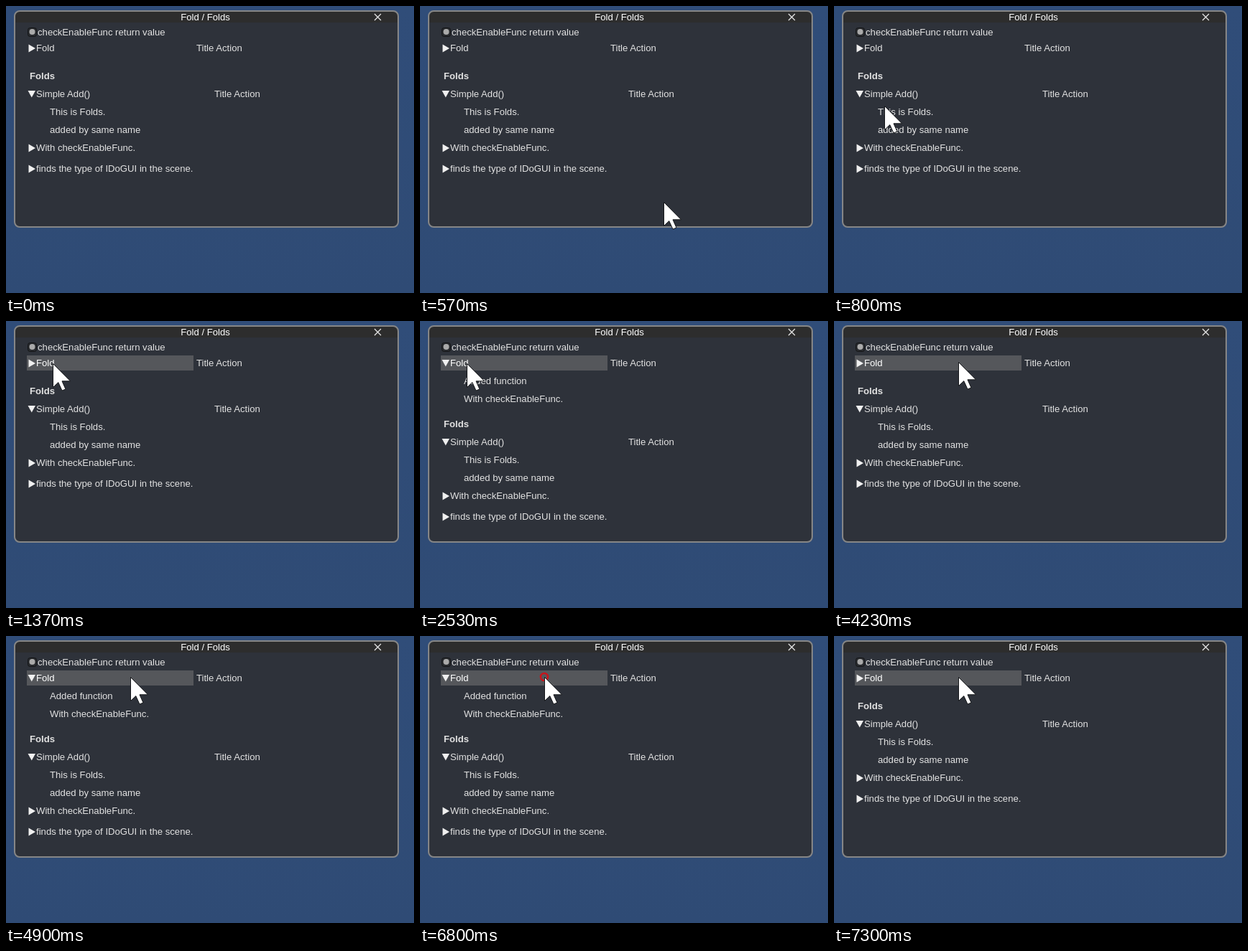
Recreate the animation shown at these times as an HTML page. Size 568x400 px, loop 7.76 s.

```html
<!DOCTYPE html>
<html lang="en">
<head>
<meta charset="utf-8">
<title>Fold / Folds</title>
<style>
  html, body { margin: 0; width: 100%; height: 100%; overflow: hidden; background: #304c78; }
  svg { display: block; width: 568px; height: 400px; }
  text { font: 13.15px "Liberation Sans", Arial, sans-serif; fill: #e2e2e2; white-space: pre; }
  .bold { font-weight: bold; }
  .bright { fill: #fff; }
</style>
</head>
<body>
<svg viewBox="0 0 568 400">
  <defs>
    <linearGradient id="sky" x2="0" y2="1">
      <stop stop-color="#304d79"/>
      <stop offset="1" stop-color="#2f4b75"/>
    </linearGradient>
  </defs>
  <rect width="568" height="400" fill="url(#sky)"/>

  <rect x="12" y="7" width="534" height="301" rx="7" fill="#2e323a"/>
  <path d="M12 23V14a7 7 0 0 1 7-7H539a7 7 0 0 1 7 7V23Z" fill="#2d2d2d"/>
  <rect x="12" y="7" width="534" height="301" rx="7" fill="none" stroke="#868686" stroke-width="2"/>
  <text class="bright" x="277.5" y="20" text-anchor="middle">Fold / Folds</text>
  <path d="M513 11l9 9m0-9l-9 9" stroke="#e6e6e6" stroke-width="1.3"/>

  <rect x="30.5" y="30.5" width="12" height="12" rx="3" fill="#292b2f" stroke="#121315"/>
  <circle cx="36.5" cy="36" r="4" fill="#aaa"/>
  <text x="44" y="41">checkEnableFunc return value</text>

  <rect id="hover" x="29" y="48" width="232" height="21" fill="#55575b"/>
  <path id="foldArrow" fill="#f0f0f0"/>
  <text id="foldLabel" x="42" y="63">Fold</text>
  <text x="265" y="63">Title Action</text>
  <g id="foldBody">
    <text x="61" y="88">Added function</text>
    <text x="61" y="113">With checkEnableFunc.</text>
  </g>

  <g id="below">
    <text class="bold" x="33" y="102">Folds</text>
    <path d="M30.5 118h10.5l-5.25 9.5z" fill="#f0f0f0"/>
    <text x="42" y="127">Simple Add()</text>
    <text x="290" y="127">Title Action</text>
    <text x="61" y="152">This is Folds.</text>
    <text x="61" y="177">added by same name</text>
    <path d="M31.5 192.500v11l9.500-5.500z" fill="#f0f0f0"/>
    <text x="42" y="202">With checkEnableFunc.</text>
    <path d="M31.5 221.500v11l9.500-5.500z" fill="#f0f0f0"/>
    <text x="42" y="231">finds the type of IDoGUI in the scene.</text>
  </g>

  <circle id="ring" fill="none" stroke="#c8141c" stroke-width="2.6"/>
  <path id="cursor" d="M.5 .5V33.500L7.800 26.600L13 38L18 36L13 24.800H24.500Z"
        fill="#fff" stroke="#15171a" stroke-width="1"/>
</svg>
<script>
  const LOOP = 7760;
  const RING_TIME = 500;
  const RELEASE_DELAY = 100;
  const FOLD_SHIFT = 46;
  const CLOSED_ARROW = "M31.5 53.5v11l9.5-5.5z";
  const OPEN_ARROW = "M30.5 54h10.5l-5.25 9.5z";

  // Pointer stops: time, x, y
  const path = [
    [300, 0, 290], [470, 499, 343], [640, 230, 225], [800, 70, 139],
    [1070, 68, 97], [1370, 65, 59], [2970, 65, 59], [3130, 77, 59],
    [3780, 77, 59], [4230, 173, 57], [LOOP, 173, 57]
  ];
  const clicks = [2030, 3430, 4400, 6800];

  const el = id => document.getElementById(id);
  const [hover, foldArrow, foldLabel, foldBody, below, ring, cursor] =
    ["hover", "foldArrow", "foldLabel", "foldBody", "below", "ring", "cursor"].map(el);
  const show = (node, on) => node.setAttribute("visibility", on ? "visible" : "hidden");
  const set = (node, attrs) => {
    for (const name in attrs) node.setAttribute(name, attrs[name]);
  };

  function pointerAt(t) {
    const i = Math.max(1, path.findIndex(stop => stop[0] > t));
    const [t0, x0, y0] = path[i - 1];
    const [t1, x1, y1] = path[i];
    let p = Math.max(0, (t - t0) / (t1 - t0));
    if (t0 > 2000) p = p * p * (3 - 2 * p);
    return [x0 + (x1 - x0) * p, y0 + (y1 - y0) * p];
  }

  function render(t) {
    const [x, y] = pointerAt(t);
    const visible = t >= 300;
    show(cursor, visible);
    set(cursor, { transform: `translate(${Math.round(x)} ${Math.round(y)})` });

    const hovered = visible && x >= 29 && x < 261 && y >= 48 && y < 69;
    show(hover, hovered);
    foldLabel.classList.toggle("bright", hovered);

    const open = clicks.filter(c => t >= c + RELEASE_DELAY).length % 2 === 1;
    show(foldBody, open);
    set(foldArrow, { d: open ? OPEN_ARROW : CLOSED_ARROW });
    set(below, { transform: `translate(0 ${open ? FOLD_SHIFT : 0})` });

    const click = clicks.find(c => t >= c && t < c + RING_TIME);
    show(ring, click !== undefined);
    if (click !== undefined) {
      const p = (t - click) / RING_TIME;
      const [cx, cy] = pointerAt(click);
      set(ring, { cx, cy, r: 5 + 20 * p, opacity: Math.min(1, 1.7 * (1 - p)) });
    }
  }

  const start = performance.now();
  function tick() {
    render((performance.now() - start) % LOOP);
    requestAnimationFrame(tick);
  }
  tick();
</script>
</body>
</html>
```
